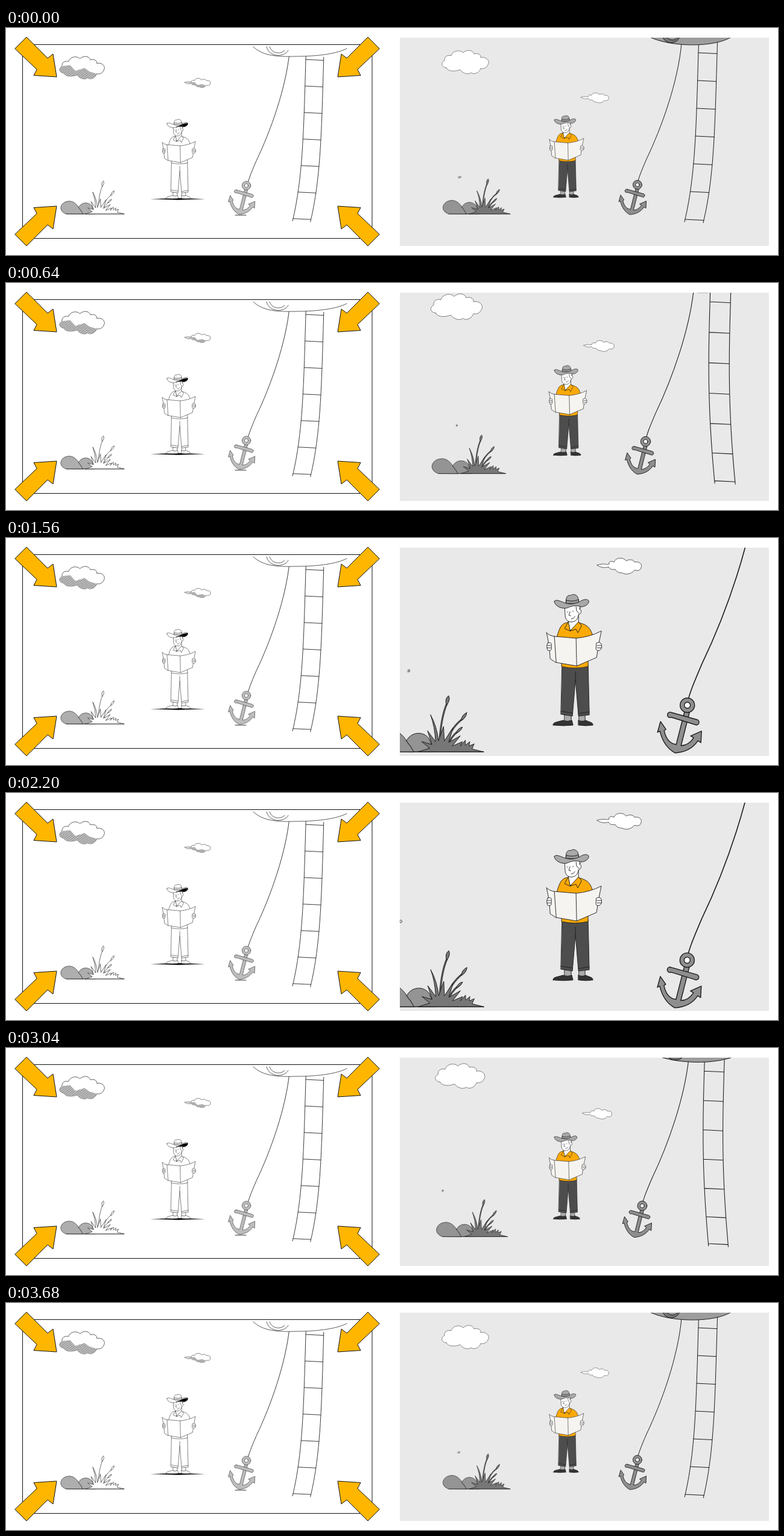
An HTML page for the animation above (3720 ms loop, 1280 by 376 pixels).

```html
<!DOCTYPE html>
<html lang="en">
<head>
<meta charset="utf-8">
<title>Sketch to scene</title>
<style>
html, body { margin: 0; width: 100%; height: 100%; overflow: hidden; background: #fff }
svg { display: block; width: 100vw; height: 100vh }
path, circle, ellipse { stroke: var(--ink); stroke-linejoin: round; stroke-linecap: round }
.sketch {
  --ink: #333; --shirt: #fff; --hat: #fff; --band: #ddd; --brim: #000; --legs: #fff; --shoe: #fff; --ankle: #fff;
  --paper: #fff; --metal: #bdbdbd; --rock: url(#hatch); --grass: #fff; --stem: #666; --stemWidth: 1.3
}
.scene {
  --ink: #1c1c1c; --shirt: #fbaa08; --hat: #a9a9a9; --band: #949494; --brim: none; --legs: #4d4d4d; --shoe: #333; --ankle: #aaa;
  --paper: #f6f4f1; --metal: #8e8e8e; --rock: #949494; --grass: #777; --stem: #4a4a4a; --stemWidth: 2.6
}
.line { fill: none }
.shirt { fill: var(--shirt) } .hat { fill: var(--hat) } .band { fill: var(--band) }
.legs { fill: var(--legs) } .shoe { fill: var(--shoe) } .ankle { fill: var(--ankle) }
.paper { fill: var(--paper) } .metal { fill: var(--metal) } .rock { fill: var(--rock) }
.grass { fill: var(--grass) } .white { fill: #fff }
.stem { fill: none; stroke: var(--stem); stroke-width: var(--stemWidth) }
.shade { fill: url(#hatch); stroke: none }
</style>
</head>
<body>
<svg viewBox="0 0 1280 376">
<defs>
  <pattern id="hatch" width="3" height="40" patternUnits="userSpaceOnUse" patternTransform="rotate(52)">
    <rect width="3" height="40" fill="#c6c6c6"/><rect width="1.3" height="40" fill="#8f8f8f"/>
  </pattern>
  <clipPath id="view"><rect x="653" y="16" width="612" height="345"/></clipPath>

  <path id="cloud" d="M730 66C722 65 720 58 727 54C726 47 733 44 738 46C740 38 752 35 758 41C764 35 774 36 776 43C782 41 788 44 787 49C797 47 803 55 799 61C797 66 792 68 787 67C785 74 776 78 771 74C766 78 757 75 753 69C746 72 733 73 730 66Z"/>
  <path id="puff" d="M980 45C990 41 996 45 1000 43C998 40 1003 37 1008 40C1010 32 1024 31 1028 38C1034 34 1042 37 1042 40C1050 38 1055 44 1053 48C1053 54 1046 55 1042 53C1038 59 1028 62 1022 58C1016 58 1012 56 1010 52C1004 53 1000 51 999 48C992 50 985 49 980 45Z"/>
  <path id="rope" class="line" d="M1120 26C1114 90 1087 165 1062 217C1053 238 1048 250 1046 262"/>

  <g id="man">
    <path class="ankle" d="M926 293H937V304H926ZM950 293H960V304H950Z"/>
    <path class="shoe" d="M907 310C906 305 914 305 923 302Q931 305 938 302L940 310Q924 312 907 310ZM949 302Q955 305 961 302C967 305 973 305 973 310Q961 312 949 310Z"/>
    <path class="legs" d="M922 210H965L967 293L949 295L944 235L939 295L920 292Z"/>
    <path class="line" d="M920 287L939 290M949 291L967 288M944 235V222"/>
    <path class="shirt" d="M930 140C921 142 918 146 912 168L921 172V213Q944 218 965 213V172L974 168C970 150 966 144 948 140Z"/>
    <path class="white" d="M935 133L932 141L935 154L949 141V128Z"/>
    <path class="shirt" d="M932 139L926 150L935 154ZM949 139L935 154L945 151L948 157L954 146Z"/>
    <path class="white" d="M926 112L927 130C928 136 933 140 939 139C945 138 948 134 949 127C954 126 955 119 951 118L951 110Z"/>
    <path class="line" d="M945 114L946 121L950 125M951 118L953 115" stroke="#777"/>
    <path class="line" d="M931 122V123M940 121V122M935 122L933 128L936 129M937 134Q941 134 943 130"/>
    <path class="hat" d="M928 108C928 99 930 95 934 95C937 96 939 92 943 94C947 95 949 98 950 109Z"/>
    <path class="band" d="M928 108L929 103Q940 106 949 102L950 109Z"/>
    <path class="hat" d="M909 105C911 101 917 104 925 107C935 111 944 109 950 106C956 102 963 100 966 104C967 108 962 113 955 114C948 112 940 111 930 116C920 118 909 112 909 105Z"/>
    <path fill="var(--brim)" style="stroke:none" d="M934 114C945 111 956 102 966 104C967 109 962 114 955 114C948 113 940 113 934 116Z"/>
    <path class="paper" d="M896 157Q901 162 909 163L945 166Q968 164 987 154Q982 175 979 198L946 212L911 206L902 200Q901 177 896 157Z"/>
    <path class="line" d="M909 163L912 206M945 166L946 212"/>
    <path class="white" d="M898 174Q904 172 904 176V184Q903 188 898 186Q895 180 898 174ZM979 174Q985 171 987 176Q989 183 984 186Q979 188 978 184Z"/>
    <path class="line" d="M897 178H903M897 182H903M980 178H987M980 182H987"/>
  </g>

  <g id="anchor">
    <path class="metal" d="M1125 287L1111 342C1101 341 1094 333 1091 319L1094 317L1085 304L1080 322L1084 320C1088 337 1096 349 1109 356C1126 355 1139 348 1147 336L1152 339L1153 320L1135 328L1140 331C1134 340 1127 344 1119 344L1133 289Z"/>
    <path class="metal" d="M1103 289L1146 301A4.5 4.5 0 1 1 1142 309L1103 297A4.5 4.5 0 1 1 1103 289Z"/>
    <circle class="metal" cx="1129.5" cy="277" r="12"/>
    <circle class="white" cx="1129.5" cy="277" r="5"/>
  </g>

  <g id="plants">
    <path class="rock" d="M677 333C661 328 661 313 673 306C688 299 700 306 708 321Q714 328 716 333Z"/>
    <path class="rock" d="M706 318C712 305 730 304 737 315L745 333H716Q713 326 706 318Z"/>
    <path class="stem" d="M751 327Q753 285 762 266M757 328Q766 300 784 287M762 328Q766 312 778 304"/>
    <path class="grass" d="M761 269Q758 260 764 256Q767 262 761 269ZM781 290Q782 282 789 279Q788 287 781 290ZM774 307Q777 300 783 299Q780 306 774 307Z"/>
    <path class="grass" d="M722 333L738 328L727 319L741 323L735 304L746 319Q745 298 739 282Q748 298 750 318L757 298L758 318L770 300L764 320L780 311L769 325L783 319L780 325L787 317L787 324L793 319L792 325L799 322L796 329L812 333Z"/>
    <path class="line" d="M677 333H812"/>
  </g>

  <path id="arrow" d="M15 34L34 15L69 50L78 43L84 81L46 78.5L51 69Z" fill="#ffb600" style="stroke:#111"/>
</defs>

<g class="sketch">
  <rect x="27.5" y="27.5" width="579.5" height="321" fill="#fff" stroke="#111"/>
  <use href="#arrow"/>
  <use href="#arrow" transform="matrix(-1 0 0 1 634 0)"/>
  <use href="#arrow" transform="matrix(1 0 0 -1 0 376)"/>
  <use href="#arrow" transform="matrix(-1 0 0 -1 634 376)"/>
  <g transform="translate(-605 11.5) scale(.96)" stroke-width=".8">
    <use href="#cloud" fill="#fff"/>
    <path class="shade" d="M730 66C722 65 720 58 727 54L741 52L750 62L766 57L774 63L787 67C785 74 776 78 771 74C766 78 757 75 753 69C746 72 733 73 730 66Z"/>
  </g>
  <g transform="translate(-272 64) scale(.58)">
    <use href="#puff" fill="#fff"/>
    <path class="shade" d="M983 46L1008 44L1016 52L1030 50L1040 54C1036 59 1028 62 1022 58C1016 58 1012 56 1010 52C1004 53 1000 51 999 48Z"/>
  </g>
  <use href="#rope" transform="translate(-599.3 13) scale(.955)"/>
  <path d="M410 31C425 46 450 48 480 47C520 47 550 42 565 34" fill="#fff" stroke-width=".8"/>
  <path class="line" d="M432 31C436 49 462 49 468 37M437 31C441 43 456 44 462 37" stroke-width=".8"/>
  <path id="sketchLadder" class="line" transform="translate(-599.3 13) scale(.955)"/>
  <path d="M239 283.2L285 281.8L330 283.2L285 284.8Z" fill="#000" style="stroke:none"/>
  <use href="#man" transform="translate(-283 94.7) scale(.605)"/>
  <path class="line" d="M380 310H398"/>
  <use href="#anchor" transform="translate(-284.8 93.4) scale(.605)"/>
  <use href="#plants" transform="translate(-381.6 71.2) scale(.711)"/>
</g>

<g class="scene" clip-path="url(#view)">
  <rect x="653" y="16" width="612" height="345" fill="#e9e9e9"/>
  <g id="world">
    <use href="#cloud" fill="#fff" stroke-width=".5"/>
    <use href="#puff" fill="#fff" transform="translate(341 86.6) scale(.625)" stroke-width=".7"/>
    <use href="#plants" transform="translate(223 56.7) scale(.7547)" stroke-width=".8"/>
    <use href="#rope"/>
    <path id="ladder" class="line"/>
    <g id="ship">
      <path d="M1053 4C1075 34 1195 38 1214 4V-30H1053Z" fill="#9d9d9d"/>
      <circle cx="1103" cy="9" r="15.5" fill="#777"/>
      <circle cx="1105" cy="9" r="11" fill="#9d9d9d"/>
    </g>
    <use href="#man" transform="translate(341 86.6) scale(.625)" stroke-width=".9"/>
    <use href="#anchor" transform="translate(341 86.6) scale(.625)" stroke-width="1.4"/>
    <g id="butterfly" fill="#fff" stroke-width=".5">
      <ellipse cx="-1.2" rx="1.2" ry="1.4"/><ellipse cx="1.2" cy="-.5" rx="1.2" ry="1.5"/>
    </g>
  </g>
</g>
</svg>
<script>
const LOOP = 3720, TAU = 2 * Math.PI;
const $ = id => document.getElementById(id);
const place = (id, value) => $(id).setAttribute('transform', value);

function easeInOut(u) {
  u = Math.min(1, Math.max(0, u));
  return u < .5 ? 4 * u ** 3 : 1 - 4 * (1 - u) ** 3;
}

// u runs from the first rung (0) to the last (1); swing bends the rails
function ladderPath(swing, top) {
  const point = (u, side) => [
    1148 - 8 * u - 14 * u ** 4 + swing * (29 * u ** 3 - 4) + side * 31,
    41 + 276 * u + swing * (8 - 6 * u ** 6) + side * 1.5
  ].map(n => n.toFixed(2)).join(' ');
  let d = '';
  for (const side of [0, 1]) {
    const rail = [];
    for (let i = 0; i <= 20; i++) rail.push(point(top + (1.015 - top) * i / 20, side));
    d += 'M' + rail.join('L');
  }
  for (let i = 0; i <= 6; i++) d += `M${point(i / 6, 0)}L${point(i / 6, 1)}`;
  return d;
}

function draw() {
  const t = performance.now() % LOOP;
  const zoom = 1 + .6 * (easeInOut((t - 165) / 1380) - easeInOut((t - 2060) / 1380));
  place('world', `translate(909 231) scale(${zoom}) translate(-909 -231)`);

  const swing = (1 - Math.cos(TAU * t / 1240)) / 2;
  $('ladder').setAttribute('d', ladderPath(swing, -.25));
  place('ship', `translate(${-4 * swing} ${7 * swing})`);

  const turn = TAU * t / LOOP;
  const angle = 1.29 - turn + .4 * (1 - Math.cos(turn)) - .33 * Math.sin(turn);
  const x = 748 + 14 * Math.cos(angle), y = 234 + 14 * Math.sin(angle);
  place('butterfly', `translate(${x} ${y}) scale(${.7 + .3 * Math.cos(TAU * t / 186)} 1)`);
  requestAnimationFrame(draw);
}

$('sketchLadder').setAttribute('d', ladderPath(0, -.02));
draw();
</script>
</body>
</html>
```
